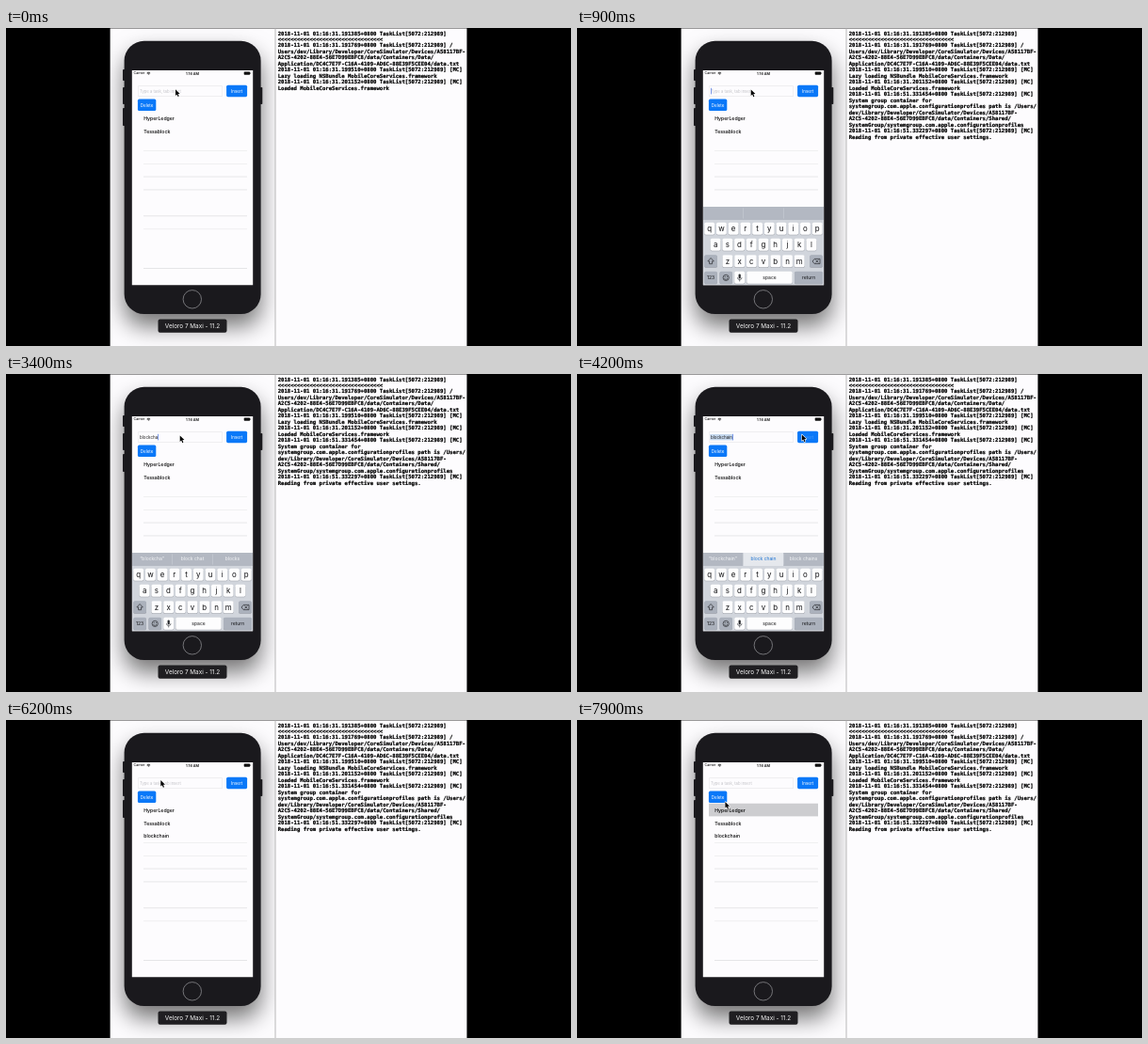
An HTML page with a canvas that plays this animation: 600x338 px, repeating every 8000 ms.

```html
<!DOCTYPE html>
<html lang="en">
<head>
<meta charset="utf-8">
<title>Task list demo</title>
<style>
html, body { margin: 0; width: 100%; height: 100%; overflow: hidden; background: #000; }
canvas { display: block; width: 600px; height: 338px; }
</style>
</head>
<body>
<canvas id="stage"></canvas>
<script>
const LOOP = 8000;
const canvas = document.getElementById('stage');
const ctx = canvas.getContext('2d');
const dpr = window.devicePixelRatio || 1;
canvas.width = 600 * dpr;
canvas.height = 338 * dpr;

const SANS = 'Inter, "Liberation Sans", sans-serif';
const MONO = '"DejaVu Sans Mono", "Liberation Mono", monospace';
const BLUE = '#0a78f8', PAPER = '#fdfcfe', BODY = '#1a191d';

const KEYS_IN = 300, KEYS_OUT = 4400, SLIDE = 350;
const LOG_AT = 600, PRESS = 4150, INSERTED = 4320, SELECTED = 7600;
const WORD = 'blockchain';
const STROKES = [2100, 2420, 2560, 2700, 2880, 3030, 3180, 3320, 3450, 3600];
const GUESSES = ['be,but', 'blue,black', 'blow,block', 'block,blocks', 'block,blocked',
  'block,blocks', 'block chat,blocks', 'block chat,blocks', 'block chain,block chair',
  'block chain,block chains'];

// time, x, y of the pointer tip
const POINTER = [
  [0, 180, 65.3], [150, 180, 65.3], [450, 184.7, 65.4], [3650, 184.7, 65.4],
  [4050, 238.8, 64.4], [4420, 238.8, 64.4], [4750, 178.6, 65.4], [5450, 178.6, 65.4],
  [5750, 244, 66], [6000, 158, 75], [6180, 164.3, 64], [6650, 164.3, 64],
  [7200, 155, 92], [7600, 155, 92], [7850, 157.4, 87]
];

const stamp = (time, tail = '') => `2018-11-01 01:16:${time}+0800 TaskList[5072:212989]${tail}`;
const LOG = [
  stamp('31.191385'),
  '<'.repeat(33),
  stamp('31.191769', ' /'),
  'Users/dev/Library/Developer/CoreSimulator/Devices/A58117BF-',
  'A2C5-4202-88E4-56E7D99EBFC8/data/Containers/Data/',
  'Application/DC4C7E7F-C16A-4109-AD6C-88E39F5CEE04/data.txt',
  stamp('31.199510', ' [MC]'),
  'Lazy loading NSBundle MobileCoreServices.framework',
  stamp('31.201152', ' [MC]'),
  'Loaded MobileCoreServices.framework',
  stamp('51.331454', ' [MC]'),
  'System group container for',
  'systemgroup.com.apple.configurationprofiles path is /Users/',
  'dev/Library/Developer/CoreSimulator/Devices/A58117BF-',
  'A2C5-4202-88E4-56E7D99EBFC8/data/Containers/Shared/',
  'SystemGroup/systemgroup.com.apple.configurationprofiles',
  stamp('51.332297', ' [MC]'),
  'Reading from private effective user settings.'
];

const clamp = v => Math.max(0, Math.min(1, v));
const smooth = v => v * v * (3 - 2 * v);
const easeOut = v => 1 - (1 - v) ** 3;

function rect(x, y, w, h, color) {
  ctx.fillStyle = color;
  ctx.fillRect(x, y, w, h);
}

function round(x, y, w, h, r, color) {
  ctx.beginPath();
  ctx.roundRect(x, y, w, h, r);
  ctx.fillStyle = color;
  ctx.fill();
}

function text(str, x, y, size, color, align = 'left', weight = 400, family = SANS) {
  ctx.font = `${weight} ${size}px ${family}`;
  ctx.textAlign = align;
  ctx.textBaseline = 'alphabetic';
  ctx.fillStyle = color;
  ctx.fillText(str, x, y + size * 0.36);
}

function stroke(color, width, points) {
  ctx.beginPath();
  points.forEach(([x, y], i) => i ? ctx.lineTo(x, y) : ctx.moveTo(x, y));
  ctx.strokeStyle = color;
  ctx.lineWidth = width;
  ctx.stroke();
}

function ring(x, y, r, color, width, from = 0, to = Math.PI * 2) {
  ctx.beginPath();
  ctx.arc(x, y, r, from, to);
  ctx.strokeStyle = color;
  ctx.lineWidth = width;
  ctx.stroke();
}

function drawDesktop() {
  rect(0, 0, 600, 338, '#000');
  rect(110.6, 0.4, 378.8, 337.6, PAPER);
  ctx.save();
  ctx.beginPath();
  ctx.rect(111, 0, 175, 338);
  ctx.clip();
  ctx.shadowColor = 'rgba(0,0,0,.55)';
  ctx.shadowBlur = 25 * dpr;
  ctx.shadowOffsetY = 13 * dpr;
  round(125.6, 13.8, 145, 290.2, 21, BODY);
  ctx.restore();
  for (const [x, y, h] of [[124, 44, 12], [124, 63, 18], [124, 85, 19], [269.9, 63, 18]])
    round(x, y, 2.4, h, 0.8, BODY);
  ring(197.8, 288.3, 9.7, '#8b8b8e', 0.8);
  round(161.5, 309.5, 73, 14.2, 2, '#1f1e21');
  text('Veloro 7 Maxi - 11.2', 198, 316.9, 6.4, '#f4f4f4', 'center');
}

function drawLog(t) {
  rect(285.6, 0, 0.8, 338, '#a9a9a9');
  const count = t < LOG_AT ? 10 : LOG.length;
  ctx.strokeStyle = '#000';
  ctx.lineWidth = 0.22;
  for (let i = 0; i < count; i++) {
    const y = 5.5 + i * 6.47;
    text(LOG[i], 288.7, y, 5.62, '#000', 'left', 700, MONO);
    ctx.strokeText(LOG[i], 288.7, y + 2.02);
  }
}

function drawStatus() {
  text('Carrier', 135.6, 48.2, 3.5, '#111', 'left', 500);
  for (const r of [0.6, 1.6, 2.6]) ring(151.4, 49.9, r, '#111', 0.8, -2.3, -0.84);
  text('1:16 AM', 198, 48.2, 3.8, '#111', 'center', 600);
  round(252.7, 46.4, 6.4, 3.4, 0.7, '#111');
  rect(259.4, 47.4, 0.5, 1.4, '#111');
}

function button(label, x, y, w, pressed) {
  round(x, y, w, 12.5, 1.6, BLUE);
  text(label, x + w / 2, y + 6.4, 4.5, pressed ? 'rgba(255,255,255,.25)' : '#fff', 'center');
}

function drawField(t, typed, lastStroke) {
  round(140, 61, 90, 12, 1.6, '#e1e1e4');
  round(140.4, 61.4, 89.2, 11.2, 1.3, PAPER);
  if (typed) {
    ctx.font = `400 4.5px ${SANS}`;
    const end = 142 + ctx.measureText(typed).width;
    if (typed === WORD) rect(141.3, 64, end - 140.8, 6.4, '#c5d8ee');
    text(typed, 142, 67, 4.5, '#222');
  } else {
    text('Type a task, tab insert', 142, 67, 4.2, '#c4c4c9');
  }
  const focused = t >= KEYS_IN && t < KEYS_OUT;
  if (focused && (t - lastStroke) % 1000 < 650) {
    ctx.font = `400 4.5px ${SANS}`;
    rect(142 + ctx.measureText(typed).width, 63.8, 0.7, 6.6, '#4a73e2');
  }
}

function drawList(t) {
  if (t >= SELECTED) rect(140, 88.7, 116, 13.7, '#cdcdd0');
  const strong = '#dcdcdf', faint = '#ebebed';
  for (const [y, color] of [[130.2, faint], [144, faint], [157.7, strong], [171.6, strong],
    [199.5, strong], [213.4, faint], [255, strong]])
    rect(146, y, 110, 0.7, color);
  const rows = ['HyperLedger', 'Tessablock'];
  if (t >= INSERTED) rows.push(WORD);
  rows.forEach((name, i) => text(name, 146.2, 95.8 + i * 13.9, 5.2, '#000', 'left', 500));
}

function key(label, x, y, w, size = 7.9, color = '#fdfdfe') {
  round(x, y + 0.6, w, 13, 1.6, '#9a9ea6');
  round(x, y, w, 13, 1.6, color);
  text(label, x + w / 2, y + 6.6, size, '#111113', 'center');
}

function drawGuesses(typed) {
  rect(134, 190, 128, 14, '#b3b8c2');
  if (typed) {
    const [a, b] = GUESSES[typed.length - 1].split(',');
    const done = typed === WORD;
    if (done) rect(176.4, 190, 42.8, 14, '#e5e8ed');
    text(`“${typed}”`, 155, 196.3, 5, '#f4f5f7', 'center');
    text(a, 198, 196.3, 5, done ? '#1c72d2' : '#f4f5f7', 'center');
    text(b, 240.5, 196.3, 5, '#f4f5f7', 'center');
  }
  for (const x of [176, 219]) rect(x, 191.5, 0.5, 11, '#cdd1d8');
}

function drawKeyIcons() {
  const ink = '#26282c';
  stroke(ink, 0.7, [[142.1, 243.8], [138.9, 247.2], [140.6, 247.2], [140.6, 250],
    [143.6, 250], [143.6, 247.2], [145.3, 247.2], [142.1, 243.8]]);
  stroke(ink, 0.7, [[250, 247.3], [252.2, 244.7], [258, 244.7], [258, 249.9], [252.2, 249.9], [250, 247.3]]);
  stroke(ink, 0.7, [[253.4, 245.8], [256.3, 248.8]]);
  stroke(ink, 0.7, [[256.3, 245.8], [253.4, 248.8]]);
  ring(158.2, 264.7, 3.1, ink, 0.7);
  ring(158.2, 265, 1.7, ink, 0.6, 0.1, Math.PI - 0.1);
  rect(156.8, 263.2, 0.8, 1, ink);
  rect(158.9, 263.2, 0.8, 1, ink);
  round(171.6, 260.8, 2.2, 4.9, 1.1, ink);
  ring(172.7, 264.5, 2.3, ink, 0.6, 0, Math.PI);
  stroke(ink, 0.6, [[172.7, 266.8], [172.7, 268.7]]);
}

function drawKeyboard(t, typed) {
  const up = easeOut(clamp((t - KEYS_IN) / SLIDE)) * (1 - easeOut(clamp((t - KEYS_OUT) / SLIDE)));
  if (up <= 0) return;
  ctx.save();
  ctx.translate(0, 84 * (1 - up));
  rect(134, 190, 128, 84, '#d1d5dc');
  drawGuesses(typed);
  ctx.translate(0, 0.7);
  const rows = [['qwertyuiop', 135.3, 206], ['asdfghjkl', 141.7, 223], ['zxcvbnm', 154.5, 240.5]];
  for (const [letters, x, y] of rows)
    [...letters].forEach((c, i) => key(c, x + i * 12.72, y, 10.8));
  const grey = '#abb1bc';
  key('', 135.3, 240.5, 13.6, 5, grey);
  key('', 247.2, 240.5, 13.6, 5, grey);
  key('123', 135.3, 258, 13.6, 5, grey);
  key('', 151.5, 258, 13.4, 5, grey);
  key('', 167.2, 258, 11, 5);
  key('space', 180.3, 258, 48.4, 5);
  key('return', 231, 258, 30, 5, grey);
  drawKeyIcons();
  ctx.restore();
}

function drawPointer(t) {
  let i = POINTER.findIndex(p => p[0] > t);
  if (i < 0) i = POINTER.length;
  const a = POINTER[i - 1], b = POINTER[i] || a;
  const k = b === a ? 0 : smooth((t - a[0]) / (b[0] - a[0]));
  ctx.save();
  ctx.translate(a[1] + (b[1] - a[1]) * k, a[2] + (b[2] - a[2]) * k);
  ctx.beginPath();
  [[0, 0], [0, 6.6], [1.5, 5.2], [2.6, 7.8], [3.7, 7.3], [2.6, 4.8], [4.7, 4.7]]
    .forEach(([x, y]) => ctx.lineTo(x, y));
  ctx.closePath();
  ctx.lineJoin = 'round';
  ctx.strokeStyle = '#fff';
  ctx.lineWidth = 1.1;
  ctx.stroke();
  ctx.fillStyle = '#000';
  ctx.fill();
  ctx.restore();
}

function draw(t) {
  ctx.setTransform(dpr, 0, 0, dpr, 0, 0);
  const count = t < INSERTED ? STROKES.filter(s => s <= t).length : 0;
  const typed = WORD.slice(0, count);
  drawDesktop();
  drawLog(t);
  ctx.save();
  ctx.beginPath();
  ctx.rect(133.8, 45, 128.4, 228.2);
  ctx.clip();
  rect(133, 45, 130, 229, PAPER);
  drawStatus();
  drawField(t, typed, count ? STROKES[count - 1] : KEYS_IN);
  button('Insert', 234.1, 60.7, 22, t >= PRESS && t < INSERTED);
  button('Delete', 139.9, 75.6, 19.4, false);
  drawList(t);
  drawKeyboard(t, typed);
  ctx.restore();
  drawPointer(t);
}

const start = performance.now();
function tick() {
  draw((performance.now() - start) % LOOP);
  requestAnimationFrame(tick);
}
tick();
</script>
</body>
</html>
```
